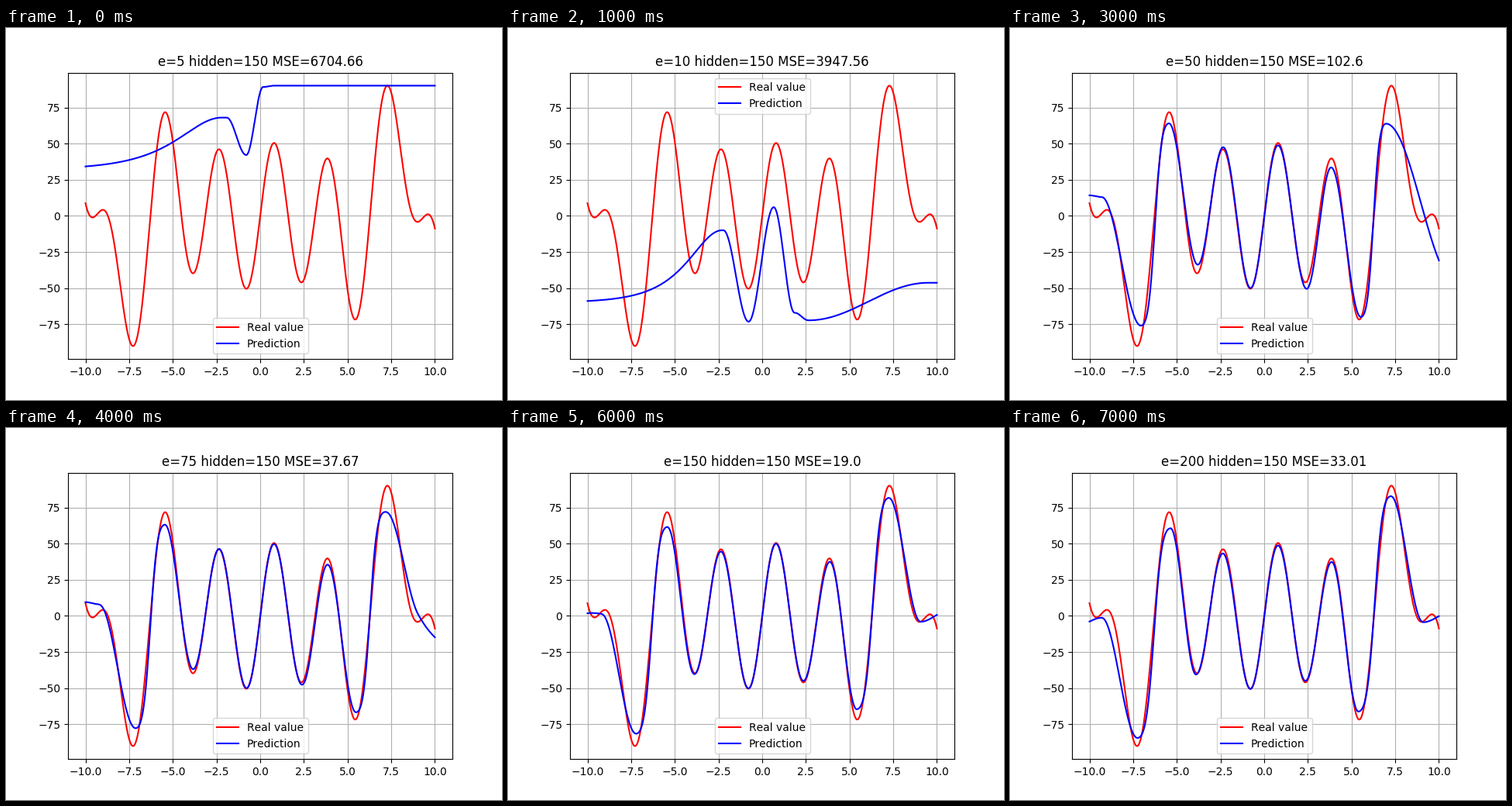
These frames come from a looping animation (640x480 px, 8000 ms). A matplotlib script:

```python
import numpy as np
import matplotlib.pyplot as plt
from matplotlib.animation import FuncAnimation

plt.rcParams["text.kerning_factor"] = 6

X = np.linspace(-10, 10, 1000)
REAL = X**2 * np.sin(X) + 50 * np.sin(2 * X)


def wave(*turns):
    """Half-cosine swings between turning points; large swings are steeper."""
    px, py = np.array(turns, float).T
    k = np.clip(np.searchsorted(px, X) - 1, 0, len(px) - 2)
    s = np.clip((X - px[k]) / (px[k + 1] - px[k]), 0, 1)
    swing = py[k + 1] - py[k]
    steep = np.where(abs(swing) > 120, 0.4, 0)
    s = s - steep * np.sin(2 * np.pi * s) / (2 * np.pi)
    return py[k] + swing * (1 - np.cos(np.pi * s)) / 2


def hump_then(peak, base, height, width, rest):
    """A slow rise up to the peak, followed by another curve."""
    rise = base + height / np.cosh((X - peak) / width)
    return np.where(X < peak, rise, rest)


def mse(fit):
    return round(float(np.mean((fit - REAL)**2)), 2)


def mix(a, b, t):
    return a + (b - a) * t


# Turning points beyond +-10 let a curve leave the plot on a slope.
fit5 = hump_then(-2.2, 32, 36, 2.235, wave(
    (-1.92, 68), (-0.8, 42.1), (0.17, 89.2), (0.8, 90.1)))

fit10 = hump_then(-2.3, -60, 50, 1.7, wave(
    (-2.22, -10), (-0.78, -73.2), (0.66, 6), (1.85, -67), (2.65, -72.3),
    (9.5, -46.3)))

fit25 = wave(
    (-11.1, 41), (-7.1, -62.3), (-5.47, 71.4), (-3.78, -27.7), (-2.4, 48.2),
    (-0.78, -48.9), (0.8, 50.1), (2.38, -56.7), (3.64, 33.7), (4.82, -21),
    (7.4, 40.1), (10.8, -45))

fit50 = wave(
    (-10, 14.2), (-9.3, 13), (-7.05, -76), (-5.45, 64), (-3.8, -33.8),
    (-2.35, 47.5), (-0.78, -50), (0.79, 48.8), (2.43, -50.5), (3.83, 33.5),
    (5.53, -70), (6.97, 63.8), (10.97, -46))

fit100 = wave(
    (-10, 4.8), (-9.15, 3), (-7.2, -80), (-5.46, 62.2), (-3.87, -40.2),
    (-2.36, 45.2), (-0.78, -50), (0.79, 50.6), (2.36, -45), (3.88, 37.5),
    (5.42, -63.8), (7.25, 81), (9.05, -3.9), (10.5, 3))

fit200 = wave(
    (-10.6, -6), (-9.3, -1.3), (-7.25, -84.5), (-5.36, 60.6), (-3.9, -40.6),
    (-2.37, 43.2), (-0.79, -50.6), (0.79, 48.7), (2.36, -45), (3.86, 37.3),
    (5.39, -66.2), (7.25, 82.8), (9.1, -4.4), (10.6, 2))

fit75 = mix(fit50, fit100, 0.5)
fit150 = mix(fit100, fit200, 0.35)

# epoch, error value, predicted curve
STEPS = [
    (5, 6704.66, fit5),
    (10, 3947.56, fit10),
    (25, 425.64, fit25),
    (50, 102.6, fit50),
    (75, mse(fit75), fit75),
    (100, 17.25, fit100),
    (150, mse(fit150), fit150),
    (200, 33.01, fit200),
]

fig, ax = plt.subplots(figsize=(6.4, 4.8), dpi=100)
ax.plot(X, REAL, color="red", label="Real value")
ax.set_xlim(-11, 11)
ax.set_ylim(1.1 * REAL.min(), 1.1 * REAL.max())
ax.grid(True)
line, = ax.plot(X, fit5, color="blue", label="Prediction")


def draw(i):
    epoch, error, fit = STEPS[i]
    line.set_ydata(fit)
    ax.set_title(f"e={epoch} hidden=150 MSE={error}")
    ax.legend(loc="upper center" if epoch == 10 else "lower center")
    return []


anim = FuncAnimation(fig, draw, frames=len(STEPS), interval=1000,
                     init_func=lambda: draw(0), repeat=True)
plt.show()
```
